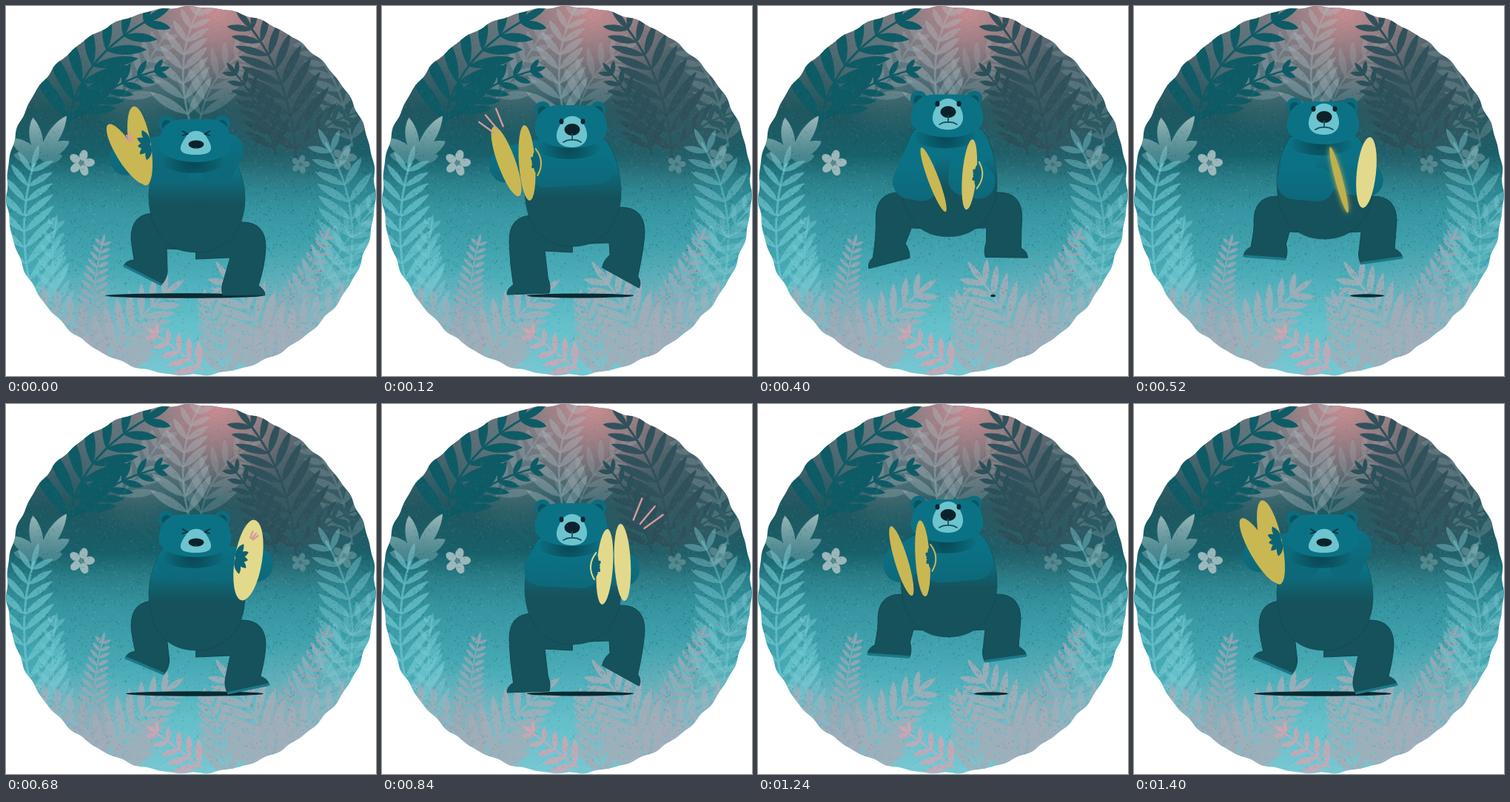
Recreate the animation shown at these times as an HTML page with a canvas. Size 500 by 500 pixels, loop 1.44 s.

```html
<!DOCTYPE html>
<html lang="en">
<head>
<meta charset="utf-8">
<title>Bear with cymbals</title>
<style>
html, body { margin: 0; height: 100%; overflow: hidden; background: #fff; }
canvas { display: block; width: 100vw; height: 100vh; }
</style>
</head>
<body>
<canvas id="stage" width="500" height="500"></canvas>
<script>
const LOOP = 1440, HOP = 720, STEP = 40, TAU = Math.PI * 2, RAD = Math.PI / 180;
const TEAL = '#0b7285', DARK = '#15525c', CX = 257;
const stage = document.getElementById('stage').getContext('2d');

// time, head top, nose drop, belly bottom, left knee xy, left foot xy + tilt,
// right knee xy, right foot xy + tilt, shadow from, shadow to
const hop = [
  [0, 153, 34, 333, 169, 280, 185, 364, 27, 351, 292, 321, 391, 0, 134, 348],
  [120, 134, 33, 325, 172, 283, 198, 389, -2, 355, 272, 322, 367, 29, 196, 340],
  [240, 124, 25, 318, 161, 264, 184, 361, -20, 356, 257, 330, 352, 14, 300, 300],
  [360, 118, 25, 312, 159, 252, 179, 351, -19, 357, 252, 335, 341, 4, 315, 315],
  [520, 129, 21, 315, 162, 257, 177, 340, 4, 355, 257, 334, 344, -8, 292, 338],
  [680, 149, 38, 333, 169, 266, 188, 354, 23, 351, 292, 327, 385, -12, 162, 348]
];
// time, left cymbal x y length width tilt, right cymbal likewise, elbows x
const clap = [
  [0, 163, 200, 47, 13, -32, 181, 189, 54, 15, -9, 166, 298],
  [120, 168, 210, 50, 12, -20, 196, 212, 51, 11, -4, 170, 290],
  [240, 187, 226, 49, 13, -23, 240, 226, 49, 6.5, 3, 188, 281],
  [520, 277, 235, 46, 5, -15, 314, 225, 48, 13, 6, 216, 288],
  [680, 327, 211, 55, 18, 9, 328, 211, 54, 18, 9, 227, 338],
  [840, 301, 220, 51, 11, 4, 325, 214, 52, 11, -3, 215, 300],
  [1080, 223, 224, 48, 6, -5, 262, 226, 46, 6, 3, 210, 292],
  [1400, 170, 198, 50, 13, -30, 185, 187, 58, 15, -12, 171, 298]
];

// Smooth periodic interpolation through the key rows
function pose(rows, t, period) {
  const n = rows.length;
  const row = j => rows[(j + n) % n];
  const time = j => row(j)[0] + Math.floor(j / n) * period;
  let i = n - 1;
  while (rows[i][0] > t) i--;
  const span = time(i + 1) - time(i), u = (t - time(i)) / span;
  return row(i).slice(1).map((a, k) => {
    const v = j => row(j)[k + 1], b = v(i + 1);
    const m0 = (b - v(i - 1)) / (time(i + 1) - time(i - 1)) * span;
    const m1 = (v(i + 2) - a) / (time(i + 2) - time(i)) * span;
    const u2 = u * u, u3 = u2 * u;
    return a * (2 * u3 - 3 * u2 + 1) + m0 * (u3 - 2 * u2 + u) + b * (3 * u2 - 2 * u3) + m1 * (u3 - u2);
  });
}

const clamp = v => Math.max(0, Math.min(1, v));

function seeded(s) {
  return () => (s = (s * 16807) % 2147483647) / 2147483647;
}

function ellipse(g, x, y, rx, ry, fill, rot = 0) {
  g.beginPath();
  g.ellipse(x, y, rx, ry, rot, 0, TAU);
  g.fillStyle = fill;
  g.fill();
}

function line(g, x0, y0, x1, y1, color, width) {
  g.beginPath();
  g.moveTo(x0, y0);
  g.lineTo(x1, y1);
  g.strokeStyle = color;
  g.lineWidth = width;
  g.stroke();
}

function fade(g, y0, y1, a, b) {
  const f = g.createLinearGradient(0, y0, 0, y1);
  f.addColorStop(0, a);
  f.addColorStop(1, b);
  return f;
}

// ---- scenery ----

function leaf(p, x, y, ang, len, w) {
  const c = Math.cos(ang), s = Math.sin(ang);
  const at = (u, v) => [x + u * c - v * s, y + u * s + v * c];
  p.moveTo(x, y);
  p.bezierCurveTo(...at(len * .3, -w * .6), ...at(len * .75, -w * .55), ...at(len, 0));
  p.bezierCurveTo(...at(len * .75, w * .45), ...at(len * .3, w * .6), x, y);
}

function frond(g, [x0, y0, cx, cy, x1, y1], n, len, w, color, spread = .8) {
  const p = new Path2D();
  for (let i = 0; i < n; i++) {
    const u = (i + .4) / n, v = 1 - u;
    const x = v * v * x0 + 2 * u * v * cx + u * u * x1;
    const y = v * v * y0 + 2 * u * v * cy + u * u * y1;
    const dir = Math.atan2(v * (cy - y0) + u * (y1 - cy), v * (cx - x0) + u * (x1 - cx));
    const size = len * (1 - .65 * u);
    for (const s of [-1, 1]) leaf(p, x, y, dir + s * spread, size, w * (1 - .4 * u));
    if (i === n - 1) leaf(p, x, y, dir, len * .45, w * .6);
  }
  g.fillStyle = g.strokeStyle = color;
  g.fill(p);
  g.lineWidth = Math.min(3, w / 5);
  g.beginPath();
  g.moveTo(x0, y0);
  g.quadraticCurveTo(cx, cy, x1, y1);
  g.stroke();
}

function glow(g, x, y, r, rgb, a) {
  const f = g.createRadialGradient(x, y, 0, x, y, r);
  f.addColorStop(0, `rgba(${rgb},${a})`);
  f.addColorStop(1, `rgba(${rgb},0)`);
  g.fillStyle = f;
  g.fillRect(0, 0, 500, 500);
}

function flower(g, x, y, r, alpha) {
  g.globalAlpha = alpha;
  for (let i = 0; i < 5; i++) {
    const a = i * TAU / 5 - 1.3;
    ellipse(g, x + Math.cos(a) * r * .58, y + Math.sin(a) * r * .58, r * .42, r * .31, '#a9c0c3', a);
  }
  ellipse(g, x, y, r * .2, r * .2, '#5f8a90');
  g.globalAlpha = 1;
}

function scenery() {
  const c = document.createElement('canvas');
  c.width = c.height = 500;
  const g = c.getContext('2d');
  g.fillStyle = '#fff';
  g.fillRect(0, 0, 500, 500);
  g.beginPath();
  for (let i = 0; i < 360; i++) {
    const a = i * RAD;
    const r = 249 + Math.sin(a * 31) * .8 + Math.sin(a * 47 + 1) * .7;
    g.lineTo(250 + r * Math.cos(a), 250 + r * Math.sin(a));
  }
  g.clip();

  const sky = g.createLinearGradient(0, 0, 0, 500);
  [[0, '#6d777d'], [.13, '#4b666f'], [.28, '#20575f'], [.4, '#17606a'], [.47, '#2a7f89'],
   [.55, '#3595a1'], [.7, '#46a9b4'], [.85, '#63bfca'], [1, '#78c8d2']]
    .forEach(([p, color]) => sky.addColorStop(p, color));
  g.fillStyle = sky;
  g.fillRect(0, 0, 500, 500);
  glow(g, 390, 110, 150, '70,90,99', .7);
  glow(g, 180, 85, 90, '125,140,147', .5);
  glow(g, 285, 5, 125, '205,142,146', .95);

  frond(g, [150, 130, 190, 80, 218, 35], 6, 50, 14, 'rgba(165,180,185,.3)');
  frond(g, [248, 155, 225, 70, 262, 2], 8, 62, 15, 'rgba(175,188,191,.38)');
  frond(g, [262, 155, 275, 85, 335, 55], 7, 60, 14, 'rgba(165,178,183,.25)');
  frond(g, [468, 190, 455, 90, 400, 45], 8, 52, 15, 'rgba(140,163,168,.3)');
  frond(g, [85, 165, 92, 70, 205, 12], 7, 92, 21, '#0e5b65', .75);
  frond(g, [98, 150, 140, 100, 215, 85], 6, 48, 14, '#0e5b65', .7);
  frond(g, [392, 205, 385, 95, 325, 22], 9, 88, 17, '#30515b', .8);
  frond(g, [365, 200, 345, 130, 305, 85], 7, 48, 12, '#2b5059', .75);
  frond(g, [395, 195, 430, 155, 482, 142], 6, 45, 11, '#2e5963', .7);

  frond(g, [45, 425, 8, 310, 38, 212], 10, 84, 15, 'rgba(118,203,212,.6)', .85);
  frond(g, [75, 430, 55, 360, 68, 290], 7, 45, 11, 'rgba(118,203,212,.45)', .7);
  frond(g, [455, 400, 490, 280, 432, 185], 9, 82, 17, 'rgba(130,203,210,.42)', .85);
  frond(g, [410, 420, 440, 330, 500, 270], 8, 62, 14, 'rgba(130,203,210,.35)', .8);

  glow(g, 100, 460, 110, '160,172,184', .65);
  glow(g, 400, 440, 120, '160,172,184', .6);
  frond(g, [150, 505, 105, 430, 45, 395], 7, 60, 17, 'rgba(167,172,184,.6)');
  frond(g, [118, 480, 112, 390, 131, 318], 15, 36, 9, 'rgba(157,167,181,.8)', .95);
  frond(g, [130, 515, 155, 435, 222, 385], 8, 82, 17, 'rgba(162,174,185,.85)', .72);
  frond(g, [335, 480, 395, 400, 434, 308], 16, 40, 10, 'rgba(155,167,180,.75)', .95);
  frond(g, [375, 515, 345, 425, 300, 368], 8, 88, 17, 'rgba(162,174,185,.85)', .72);
  frond(g, [300, 510, 290, 440, 273, 398], 6, 58, 15, 'rgba(162,174,185,.8)', .6);
  frond(g, [340, 500, 390, 440, 462, 390], 8, 64, 16, 'rgba(165,176,187,.6)');
  frond(g, [266, 492, 235, 468, 195, 438], 5, 38, 12, 'rgba(214,164,178,.75)', .9);

  const plant = new Path2D();
  [[-100, 56], [-58, 68], [-145, 48], [-30, 46], [-172, 36], [-5, 30]]
    .forEach(([a, len]) => leaf(plant, 46, 206, a * RAD, len, 21));
  g.fillStyle = fade(g, 147, 218, 'rgba(180,203,205,.85)', 'rgba(110,165,172,.4)');
  g.fill(plant);
  flower(g, 102, 212, 18, .9);
  flower(g, 398, 214, 13, .35);
  flower(g, 457, 205, 17, .38);

  const rnd = seeded(71);
  for (let i = 0; i < 9000; i++) {
    const y = rnd() * 500, mid = 1 - Math.min(1, Math.abs(y - 270) / 220);
    g.fillStyle = rnd() < .55 ? `rgba(5,55,66,${.06 + mid * .14})` : `rgba(190,235,238,${.04 + mid * .07})`;
    const s = 1 + rnd() * 1.2;
    g.fillRect(rnd() * 500, y, s, s);
  }
  return c;
}

// ---- bear ----

function leg(g, s, kx, ky, fx, fy, tilt, sole) {
  const c = Math.cos(tilt * RAD), n = Math.sin(tilt * RAD);
  const at = (along, up) => [fx + s * along * c + up * n, fy + s * along * n - up * c];
  g.beginPath();
  g.moveTo(CX, ky + 6);
  g.lineTo(kx - s * 32, ky);
  g.quadraticCurveTo(kx, ky, kx, ky + 34);
  g.quadraticCurveTo(kx - s, fy - 40, ...at(20, 13));
  g.quadraticCurveTo(...at(29, 8), ...at(29, 0));
  g.lineTo(...at(-28, 0));
  g.quadraticCurveTo(...at(-31, 10), ...at(-27, 20));
  g.lineTo(kx - s * 48, ky + 48);
  g.lineTo(CX, ky + 50);
  g.closePath();
  g.fillStyle = DARK;
  g.fill();
  g.strokeStyle = '#104751';
  g.lineWidth = 1;
  g.stroke();
  if (sole > 0) {
    g.globalAlpha = sole;
    line(g, ...at(28, 0), ...at(-27, 0), '#1b7889', 3.5);
    g.globalAlpha = 1;
  }
}

function torso(g, top, bottom) {
  const y = top + 48, wide = bottom - 72;
  g.beginPath();
  g.moveTo(CX - 46, y);
  g.bezierCurveTo(CX - 56, y + 15, CX - 65, wide - 25, CX - 64, wide);
  g.bezierCurveTo(CX - 62, bottom - 25, CX - 38, bottom, CX, bottom);
  g.bezierCurveTo(CX + 40, bottom, CX + 66, bottom - 30, CX + 66, wide);
  g.bezierCurveTo(CX + 66, wide - 25, CX + 58, y + 15, CX + 46, y);
  g.closePath();
  g.fillStyle = fade(g, bottom - 110, bottom - 66, TEAL, DARK);
  g.fill();
  g.strokeStyle = 'rgba(12,66,76,.45)';
  g.lineWidth = 1;
  g.stroke();
}

function arm(g, sx, sy, ex, ey, hx, hy) {
  g.beginPath();
  g.moveTo(sx, sy);
  g.lineTo(ex, ey);
  g.lineTo(hx, hy);
  g.strokeStyle = fade(g, ey - 25, ey + 28, TEAL, '#0d6879');
  g.lineWidth = 46;
  g.stroke();
}

function head(g, top, drop, shut) {
  const shade = g.createRadialGradient(CX - 4, top + 56, 5, CX - 4, top + 56, 44);
  shade.addColorStop(0, 'rgba(8,62,74,.75)');
  shade.addColorStop(1, 'rgba(8,62,74,0)');
  ellipse(g, CX - 4, top + 58, 42, 15, shade);

  for (const x of [217, 292]) {
    ellipse(g, x, top + 6, 11, 11, '#0b6c7e');
    ellipse(g, x, top + 8, 6.5, 7, '#0e525f');
  }
  g.beginPath();
  g.moveTo(207, top + 28);
  g.bezierCurveTo(211, top + 4, 226, top, 242, top);
  g.lineTo(270, top);
  g.bezierCurveTo(288, top, 301, top + 4, 304, top + 28);
  g.bezierCurveTo(307, top + 46, 290, top + 57, CX, top + 58);
  g.bezierCurveTo(222, top + 57, 203, top + 46, 207, top + 28);
  g.fillStyle = TEAL;
  g.fill();

  const y = top + drop, low = shut ? 14 : 24;
  g.beginPath();
  g.moveTo(CX - 14, y - 10);
  g.bezierCurveTo(CX - 8, y - 21, CX + 8, y - 21, CX + 14, y - 10);
  g.bezierCurveTo(CX + 26, y + 8, CX + 20, y + low, CX, y + low);
  g.bezierCurveTo(CX - 22, y + low, CX - 27, y + 8, CX - 14, y - 10);
  g.fillStyle = '#6cc4cf';
  g.fill();

  ellipse(g, CX, y, 10.5, shut ? 5.5 : 8, '#0c222b');
  g.strokeStyle = '#124e5a';
  g.lineWidth = 1.7;
  g.beginPath();
  g.moveTo(CX, y + 5);
  g.lineTo(CX, y + low - 10);
  if (!shut) {
    g.moveTo(CX - 12, y + 17);
    g.quadraticCurveTo(CX - 6, y + 13, CX, y + 14);
    g.quadraticCurveTo(CX + 6, y + 13, CX + 12, y + 17);
  }
  g.stroke();

  for (const s of [-1, 1]) {
    const x = CX + s * 14.5, ey = y - 14;
    if (shut) {
      line(g, x + s * 4, ey - 4, x - s * 3, ey, '#0c303a', 1.6);
      line(g, x - s * 3, ey, x + s * 4, ey + 2, '#0c303a', 1.6);
    } else {
      ellipse(g, x, ey + 3, 3, 3.8, '#0c222b');
    }
  }
}

function cymbal(g, [x, y, len, w, tilt], color, grip) {
  g.save();
  g.translate(x, y);
  g.rotate(tilt * RAD);
  ellipse(g, 0, 0, Math.max(3, w), len, color);
  if (grip) {
    const slim = w < 12, base = grip * (slim ? w + 5 : w - 1);
    const p = new Path2D();
    for (let i = -2; i <= 2; i++) {
      const inward = grip > 0 ? Math.PI : 0;
      leaf(p, base, 0, inward + i * .6, (slim ? 10 : 17) + Math.abs(i) * 2.5, 10);
    }
    g.fillStyle = '#0d6374';
    g.fill(p);
    if (slim) {
      g.beginPath();
      g.moveTo(grip * (w + 2), -18);
      g.quadraticCurveTo(grip * (w + 14), 0, grip * (w + 2), 18);
      g.strokeStyle = color;
      g.lineWidth = 2;
      g.stroke();
    }
  }
  g.restore();
}

function sparks(g, x, y, s, age) {
  if (age < 0 || age > 220) return;
  const q = age / 160, out = 17 + 48 * Math.min(1, q), inn = Math.min(out, 8 + 26 * q + Math.max(0, q - 1) * 70);
  for (const a of [-68, -50, -36]) {
    const c = s * Math.cos(a * RAD), n = Math.sin(a * RAD);
    line(g, x + c * inn, y + n * inn, x + c * out, y + n * out, '#d69a9b', 2.4);
  }
}

const brass = x => {
  const k = clamp((x - 280) / 20);
  return `rgb(${[[201, 227], [183, 217], [84, 140]].map(([a, b]) => Math.round(a + (b - a) * k))})`;
};

function bear(g, t) {
  const beat = t % HOP;
  const [top, drop, bottom, lkx, lky, lfx, lfy, la, rkx, rky, rfx, rfy, ra, from, to] = pose(hop, beat, HOP);
  const p = pose(clap, t, LOOP), left = p.slice(0, 5), right = p.slice(5, 10), [le, re] = p.slice(10);
  const shut = beat >= 620 || beat < 60;
  const sole = beat < 60 ? 1 : clamp((beat - 440) / 60);

  if (to - from > 4) ellipse(g, (from + to) / 2, 391.5, (to - from) / 2, Math.min(3.2, 1.8 + (to - from) / 120), '#082a33');
  leg(g, -1, lkx, lky, lfx, lfy, la, sole);
  leg(g, 1, rkx, rky, rfx, rfy, ra, beat < 40 ? 0 : sole);
  torso(g, top, bottom);

  const [lx, ly] = left, [rx, ry] = right;
  const cross = clamp((lx - 190) / 90), back = clamp((300 - rx) / 30);
  const drawLeft = () => arm(g, 228, top + 66, le, ly + 3, lx - 30 * cross, ly + 6);
  const drawRight = () => arm(g, 286, top + 66, re, ry + 6, rx + 25 * back, ry + 10);
  if (lx > 270) { drawRight(); drawLeft(); } else { drawLeft(); drawRight(); }
  head(g, top, drop, shut);

  const first = () => {
    g.save();
    if (t > 470 && t < 610) {
      g.shadowColor = '#c9b754';
      g.shadowBlur = 7;
    }
    cymbal(g, left, t > 470 && t < 560 ? '#c0b04e' : brass(lx), lx > 290 ? -1 : 0);
    g.restore();
  };
  const second = () => cymbal(g, right, brass(rx), rx < 290 ? 1 : 0);
  if (lx > 270) { second(); first(); } else { first(); second(); }

  sparks(g, 327, 188, 1, t - 680);
  sparks(g, 174, 188, -1, t);
}

stage.lineCap = stage.lineJoin = 'round';
const back = scenery();
let start;

function frame(now) {
  start ??= now;
  const t = Math.floor((now - start) % LOOP / STEP) * STEP;
  stage.drawImage(back, 0, 0);
  bear(stage, t);
  requestAnimationFrame(frame);
}
requestAnimationFrame(frame);
</script>
</body>
</html>
```
